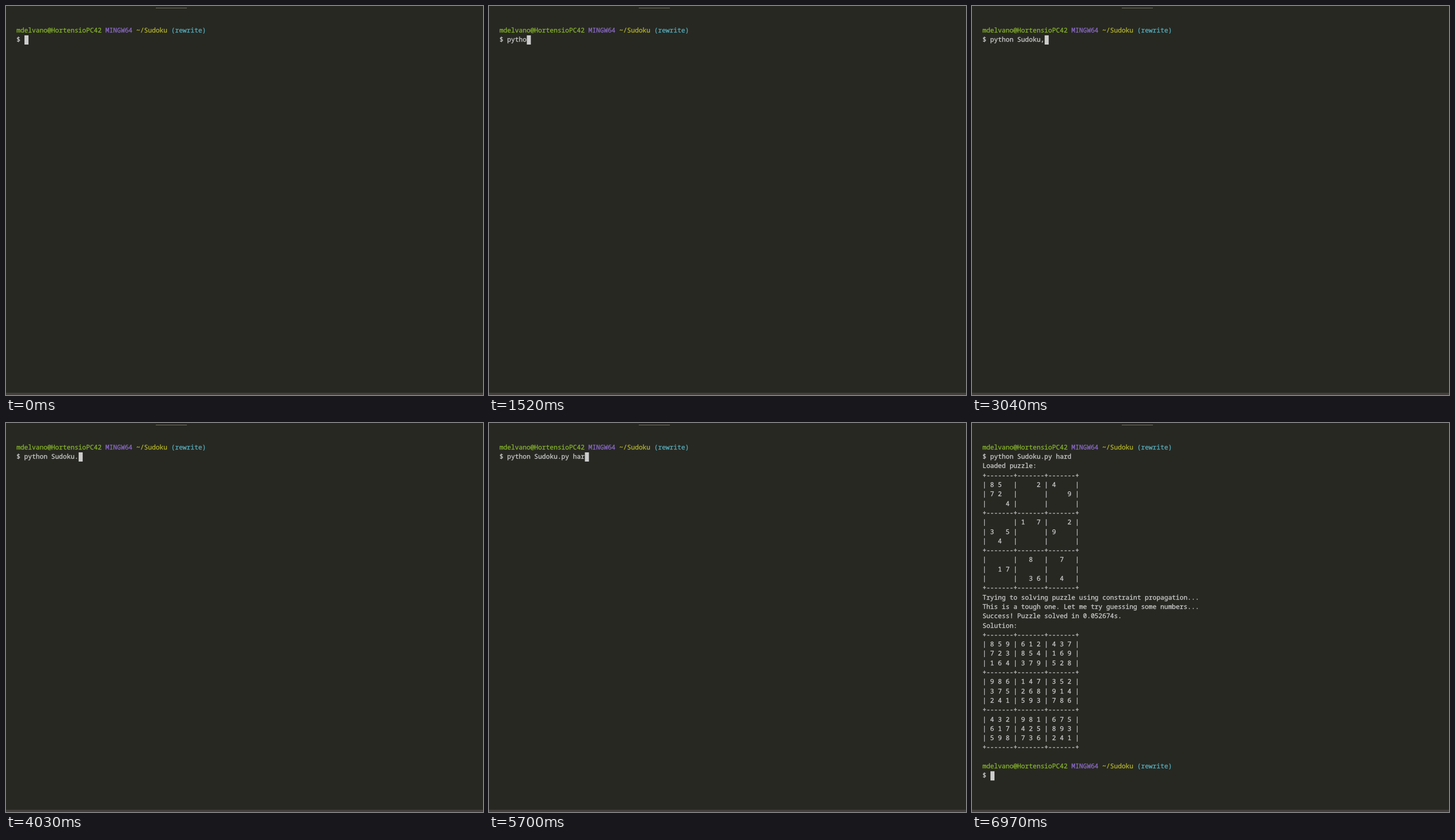
Write an HTML page that moves like this. It is 828 px wide and 676 px high and loops after 8000 ms.

```html
<!DOCTYPE html>
<html lang="en">
<head>
<meta charset="utf-8">
<title>Sudoku solver in a terminal</title>
<style>
  html, body { margin: 0; width: 100%; height: 100%; overflow: hidden; background: #272822; }
  #stage { position: relative; width: 828px; height: 676px; overflow: hidden; }
  #stage > * { position: absolute; }
  #tab { left: 260px; top: 3px; width: 54px; height: 1px; background: #75715e; }
  #status { left: 0; top: 672px; width: 828px; height: 4px; background: #423f3c; }
  #screen {
    left: 18.2px; top: 34.9px; margin: 0; color: #ccc;
    font: 500 11.2px/16.3px "Noto Sans Mono", "DejaVu Sans Mono", monospace;
    font-variant-ligatures: none; text-rendering: geometricPrecision;
    -webkit-text-stroke: 0.3px;
  }
  #cursor { left: 0; top: 0; width: 6.72px; height: 16px; background: #ccc; }
  .user { color: #86b42b; }
  .system { color: #8c6bc8; }
  .path { color: #b3b42b; }
  .branch { color: #56adbc; }
</style>
</head>
<body>
<div id="stage">
  <div id="tab"></div>
  <div id="status"></div>
  <pre id="screen"></pre>
  <div id="cursor"></div>
</div>
<script>
const LOOP = 8000, CELL = 6.72, LINE = 16.3;
const screen = document.getElementById('screen');
const cursor = document.getElementById('cursor');

const span = (name, text) => `<span class="${name}">${text}</span>`;
const prompt = [
  span('user', 'mdelvano@HortensioPC42'), span('system', 'MINGW64'),
  span('path', '~/Sudoku'), span('branch', '(rewrite)')
].join(' ') + '\n$ ';

// Bursts of evenly spaced keys, from the first key's time to the last's.
const bursts = [
  ['p', 990, 990], ['yth', 1260, 1380], ['on ', 1520, 1720],
  ['S', 2060, 2060], ['udo', 2320, 2510], ['ku,', 2710, 3040],
  ['\b.', 3830, 4030], ['py ', 4360, 4690], ['har', 5490, 5700], ['d', 6250, 6250]
];

function typed(time) {
  let text = '';
  for (const [keys, from, to] of bursts) {
    [...keys].forEach((key, i) => {
      if (time < from + (to - from) * i / (keys.length - 1 || 1)) return;
      text = key === '\b' ? text.slice(0, -1) : text + key;
    });
  }
  return text;
}

const row = i => Math.floor(i / 9);
const box = i => Math.floor(i / 27) * 3 + Math.floor(i % 9 / 3);
const indexes = [...Array(81).keys()];
const peers = indexes.map(i => indexes.filter(j =>
  row(i) === row(j) || i % 9 === j % 9 || box(i) === box(j)));

// Fill the most constrained empty cell first and backtrack on dead ends.
function solve(cells) {
  let next;
  for (const i of indexes) {
    if (cells[i] !== '.') continue;
    const used = new Set(peers[i].map(j => cells[j]));
    const options = [...'123456789'].filter(digit => !used.has(digit));
    if (!next || options.length < next.options.length) next = { i, options };
  }
  if (!next) return cells;
  for (const digit of next.options) {
    const result = solve(cells.slice(0, next.i) + digit + cells.slice(next.i + 1));
    if (result) return result;
  }
}

function board(cells) {
  const border = '+-------+-------+-------+\n';
  const lines = cells.replace(/\./g, ' ').match(/.{9}/g).map(line =>
    '| ' + line.match(/.../g).map(part => [...part].join(' ')).join(' | ') + ' |\n');
  return lines.map((line, i) => (i % 3 ? '' : border) + line).join('') + border.trim();
}

const puzzle = '85...24..72......9..4.........1.7..23.5...9...4...........8..7..17..........36.4.';
const entered = prompt + typed(LOOP) + '\n';
const loaded = entered + 'Loaded puzzle:\n' + board(puzzle);
const solved = loaded + `
Trying to solving puzzle using constraint propagation...
This is a tough one. Let me try guessing some numbers...
Success! Puzzle solved in 0.052674s.
Solution:
` + board(solve(puzzle)) + '\n';

function textAt(time) {
  if (time < 6640) return prompt + typed(time);
  if (time < 6700) return entered;
  if (time < 6770) return loaded;
  return time < 6970 ? solved : solved + '\n' + prompt;
}

let shown;
function draw() {
  const text = textAt(performance.now() % LOOP);
  if (text !== shown) {
    shown = text;
    screen.innerHTML = text;
    const lines = screen.textContent.split('\n');
    const x = 18.6 + CELL * lines.at(-1).length;
    const y = 51 + LINE * (lines.length - 2);
    cursor.style.transform = `translate(${x}px, ${y}px)`;
  }
  requestAnimationFrame(draw);
}
draw();
</script>
</body>
</html>
```
